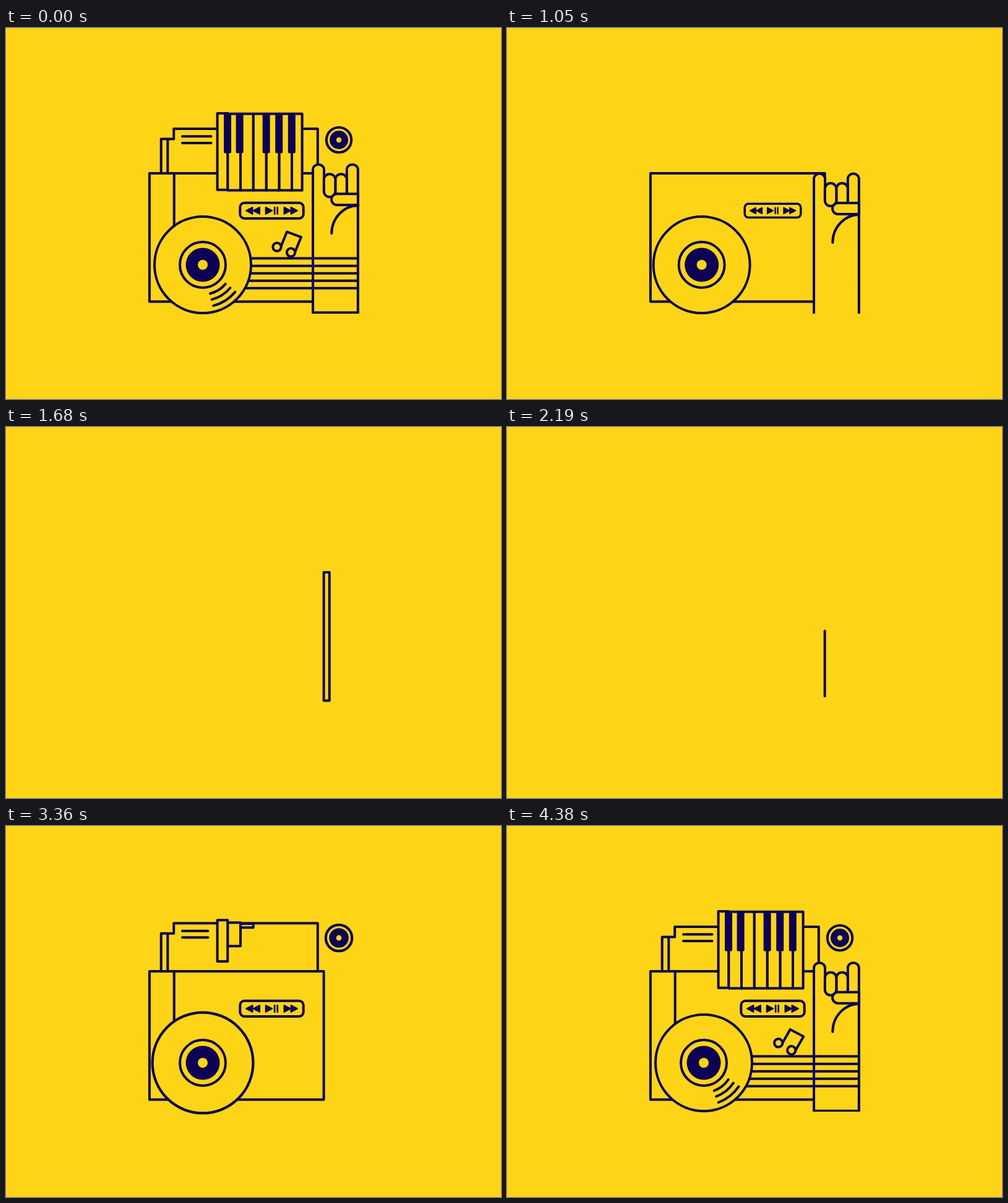
These frames come from a looping animation (800x600 px, 4.41 s). An HTML page with a canvas:

```html
<!DOCTYPE html>
<html lang="en">
<head>
<meta charset="utf-8">
<style>
html, body { margin: 0; width: 100%; height: 100%; overflow: hidden; background: #fdd516; }
canvas { display: block; width: 800px; height: 600px; }
</style>
</head>
<body>
<canvas id="stage" width="800" height="600"></canvas>
<script>
const LOOP = 4410;
const PAPER = '#fdd516';
const INK = '#0e0055';
const ctx = document.getElementById('stage').getContext('2d');

// Easing
const clamp = x => Math.max(0, Math.min(1, x));
const ramp = (t, start, length) => clamp((t - start) / length);
const backIn = (x, s) => (s + 1) * x ** 3 - s * x * x;
const easeOut = x => 1 - (1 - x) ** 2;

// Damped swing from 0 to 1; the first peak comes after `half` ms.
function spring(t, start, half, over) {
  const x = (t - start) / half;
  return x <= 0 ? 0 : 1 - over ** x * Math.cos(Math.PI * x);
}

// Springs in during the second half of the loop, backs out during the first.
function presence(t, inStart, half, over, outStart, outLength, s) {
  return t > LOOP / 2
    ? spring(t, inStart, half, over)
    : 1 - backIn(ramp(t, outStart, outLength), s);
}

// Drawing helpers
function paint(fill) {
  if (fill) {
    ctx.fillStyle = fill;
    ctx.fill();
  }
  ctx.stroke();
}

function poly(points, fill, closed) {
  ctx.beginPath();
  points.forEach(([x, y]) => ctx.lineTo(x, y));
  if (closed) ctx.closePath();
  paint(fill);
}

const line = (x1, y1, x2, y2) => poly([[x1, y1], [x2, y2]]);

function box(left, top, right, bottom, radius = 0, fill = PAPER) {
  ctx.beginPath();
  if (radius) ctx.roundRect(left, top, right - left, bottom - top, radius);
  else ctx.rect(left, top, right - left, bottom - top);
  paint(fill);
}

function disc(x, y, r, fill) {
  ctx.beginPath();
  ctx.arc(x, y, Math.max(0, r), 0, 2 * Math.PI);
  ctx.fillStyle = fill;
  ctx.fill();
}

function ring(x, y, r) {
  ctx.beginPath();
  ctx.arc(x, y, r, 0, 2 * Math.PI);
  paint(PAPER);
}

function scaled(x, y, scale, draw) {
  if (scale < 0.01) return;
  ctx.save();
  ctx.translate(x, y);
  ctx.scale(scale, scale);
  draw();
  ctx.restore();
}

function clipped(x, y, w, h, draw) {
  ctx.save();
  ctx.beginPath();
  ctx.rect(x, y, w, h);
  ctx.clip();
  draw();
  ctx.restore();
}

// Parts
function drawBooks(t) {
  const up = presence(t, 3140, 200, 0.1, 300, 660, 1.7);
  if (up < 0.01) return;
  const y = 163 + 76 * (1 - up);
  poly([[250.7, 330], [250.7, y + 16.5], [271.2, y + 16.5], [271.2, y],
        [503.8, y], [503.8, 330]], PAPER);
  line(261.3, y + 16.5, 261.3, 330);
  const grow = t > LOOP / 2 ? easeOut(ramp(t, 3200, 240)) : 1;
  if (grow > 0) {
    for (const dy of [12.3, 23]) line(285, y + dy, 285 + 46.5 * grow, y + dy);
  }
}

function drawSmallRecord(t) {
  scaled(538, 181, presence(t, 3195, 180, 0.04, 300, 660, 1.7), () => {
    ring(0, 0, 20.2);
    disc(0, 0, 15, INK);
    disc(0, 0, 4.2, PAPER);
  });
}

const BODY_RIGHT = 513.6;
const BODY_LEFT = 231.9;

function bodyBounds(t) {
  const width = BODY_RIGHT - BODY_LEFT;
  let left, top = 235, bottom = 442.5;
  if (t < 2147) {
    left = BODY_LEFT + width * backIn(ramp(t, 1080, 428), 1.15);
    left += 13 * Math.sin(Math.PI * ramp(t, 1508, 230));
    const drop = 17.6 * Math.sin(Math.PI * ramp(t, 1050, 600));
    top += drop + 207.5 * ramp(t, 1738, 352) ** 2;
    bottom += drop;
  } else {
    left = BODY_RIGHT - width * spring(t, 2700, 115, 0.05);
    top = bottom - 207.5 * spring(t, 2147, 150, 0.385);
    bottom -= 7.5 * (1 - ramp(t, 2190, 60));
    top = Math.min(top, bottom);
  }
  return { left, top, bottom };
}

function drawBody(t) {
  if (t > 2090 && t < 2147) return;
  const { left, top, bottom } = bodyBounds(t);
  if (Math.abs(left - BODY_RIGHT) < 0.1) line(BODY_RIGHT, top, BODY_RIGHT, bottom);
  else box(left, top, BODY_RIGHT, bottom);
  const spine = t > LOOP / 2 ? easeOut(ramp(t, 3060, 200)) : 1 - ramp(t, 820, 180);
  if (spine > 0) line(271.7, 235, 271.7, 235 + 150 * spine);
}

function arrow(x, dir) {
  poly([[x, -5.5], [x + 10.5 * dir, 0], [x, 5.5]], INK, true);
}

function drawControls(t) {
  scaled(429.5, 295.4, presence(t, 2740, 125, 0.06, 780, 380, 1.7), () => {
    box(-51.2, -12.6, 51.2, 12.6, 7);
    ctx.lineWidth = 2;
    arrow(-31, -1);
    arrow(-19.5, -1);
    arrow(-9.8, 1);
    arrow(20, 1);
    arrow(31, 1);
    ctx.lineWidth = 2.7;
    for (const x of [4.6, 9.2]) line(x, -5.3, x, 5.3);
  });
}

const KEY_EDGES = [341.6, 358.2, 379, 399.6, 420.6, 441.4, 462, 478.6];
const BLACK_KEYS = [358, 377.6, 420.6, 441.2, 461.8];

function drawPiano(t) {
  const entering = t > LOOP / 2;
  for (let i = 6; i >= 0; i--) {
    const p = entering
      ? spring(t, 3295 + 30 * i, 330, 0.06)
      : 1 - backIn(ramp(t, 660 - 30 * i, 260), 1);
    if (p < 0.005) continue;
    const rest = i ? 138.8 : 138;
    const top = entering ? 158 - (158 - rest) * Math.min(1, p * p) : rest;
    box(KEY_EDGES[i], top, KEY_EDGES[i + 1], top + 123.7 * p);
  }
  BLACK_KEYS.forEach((x, i) => {
    const p = entering
      ? spring(t, 3550 + 30 * i, 150, 0.08)
      : 1 - ramp(t, 625 - 30 * i, 207);
    if (p < 0.02) return;
    ctx.beginPath();
    ctx.roundRect(x - 6, 138, 12, 64.5 * p, [0, 0, 2, 2]);
    ctx.fillStyle = INK;
    ctx.fill();
  });
}

const INDEX = new Path2D('M568.8 460H496V229A9 8.5 0 0 1 514 229V262');
const PINKY = new Path2D('M568.8 460V229A9 8.5 0 0 0 550.8 229V268');
const THUMB = new Path2D('M568.8 268H535A9 9 0 0 0 535 286H568.8Z');
const CREASE = new Path2D('M568.8 287A43 45 0 0 0 526.3 332');

function drawHand(t) {
  const up = t > LOOP / 2 || t < 540
    ? spring(t < 540 ? t + LOOP : t, 3790, 255, 0.1)
    : 1 - backIn(ramp(t, 780, 460), 1);
  if (up < 0.005) return;
  clipped(480, 150, 110, 312, () => {
    ctx.translate(0, 244 * (1 - up));
    ctx.fillStyle = PAPER;
    ctx.fillRect(496, 250, 72.8, 210);
    for (const finger of [INDEX, PINKY]) {
      ctx.fill(finger);
      ctx.stroke(finger);
    }
    box(532.3, 236, 550.8, 273, 9);
    box(513.8, 236, 532.3, 273, 9);
    ctx.fillStyle = PAPER;
    ctx.fill(THUMB);
    ctx.stroke(THUMB);
    ctx.stroke(CREASE);
  });
}

function drawStrings(t) {
  for (let i = 0; i < 5; i++) {
    const p = t > LOOP / 2
      ? easeOut(ramp(t, 3850 + 30 * i, 270))
      : 1 - ramp(t, 200 + 30 * i, 250) ** 2;
    const y = 372.6 + 12.05 * i;
    if (p > 0) line(350, y, 350 + 218.8 * p, y);
  }
}

// Time around the loop seam, in units of 660 ms.
const seamTime = t => (t > LOOP / 2 ? t - LOOP : t) / 660;

function drawGrooves(t) {
  const span = t > LOOP / 2 ? ramp(t, 4080, 220) : 1 - ramp(t, 700, 160);
  if (span <= 0) return;
  const u = seamTime(t);
  const mid = 57.5 + 125 * u - 21 * u * u;
  const rad = Math.PI / 180;
  for (const r of [48, 58, 68.3]) {
    ctx.beginPath();
    ctx.arc(0, 0, r, (mid - 17.7 * span) * rad, (mid + 17.7 * span) * rad);
    ctx.stroke();
  }
}

function drawRecord(t) {
  const entering = t > LOOP / 2;
  if (!entering && t > 1440) return;
  const x = entering ? 318 : 318 + 282 * backIn(ramp(t, 1012, 400), 1.5);
  const grow = (start, half, over) => entering ? spring(t, start, half, over) : 1;
  clipped(0, 0, 515.5, 600, () => {
    scaled(x, 383, grow(2840, 500, 0.05), () => ring(0, 0, 78));
    scaled(x, 383, grow(2970, 170, 0.08), () => ring(0, 0, 37));
    scaled(x, 383, grow(2918, 180, 0.08), () => {
      disc(0, 0, 27.5, INK);
      disc(0, 0, 8, PAPER);
    });
    scaled(x, 383, 1, () => drawGrooves(t));
  });
  if (!entering && t > 1080) {
    const { top, bottom } = bodyBounds(t);
    line(BODY_RIGHT, top, BODY_RIGHT, bottom);
  }
}

function drawNote(t) {
  const scale = t > LOOP / 2
    ? spring(t, 4080, 140, 0.08)
    : 1 - backIn(ramp(t, 680, 180), 1);
  if (scale < 0.01) return;
  const u = seamTime(t);
  scaled(457 - 16 * u * (2 - u), 346.5 + 8 * u - 85 * u * u, scale, () => {
    ctx.rotate(-121 * u * (1.4 - 0.4 * u) * Math.PI / 180);
    poly([[-12.6, 7], [-3, -16.8], [20, -8.2], [10, 16]]);
    ring(-19, 7.5, 6.7);
    ring(3.5, 16.5, 6.7);
  });
}

const PARTS = [drawBooks, drawSmallRecord, drawBody, drawControls, drawPiano,
               drawHand, drawStrings, drawRecord, drawNote];

function frame() {
  const t = performance.now() % LOOP;
  ctx.fillStyle = PAPER;
  ctx.fillRect(0, 0, 800, 600);
  ctx.strokeStyle = INK;
  ctx.lineCap = ctx.lineJoin = 'round';
  for (const draw of PARTS) {
    ctx.lineWidth = 4;
    draw(t);
  }
  requestAnimationFrame(frame);
}
frame();
</script>
</body>
</html>
```
